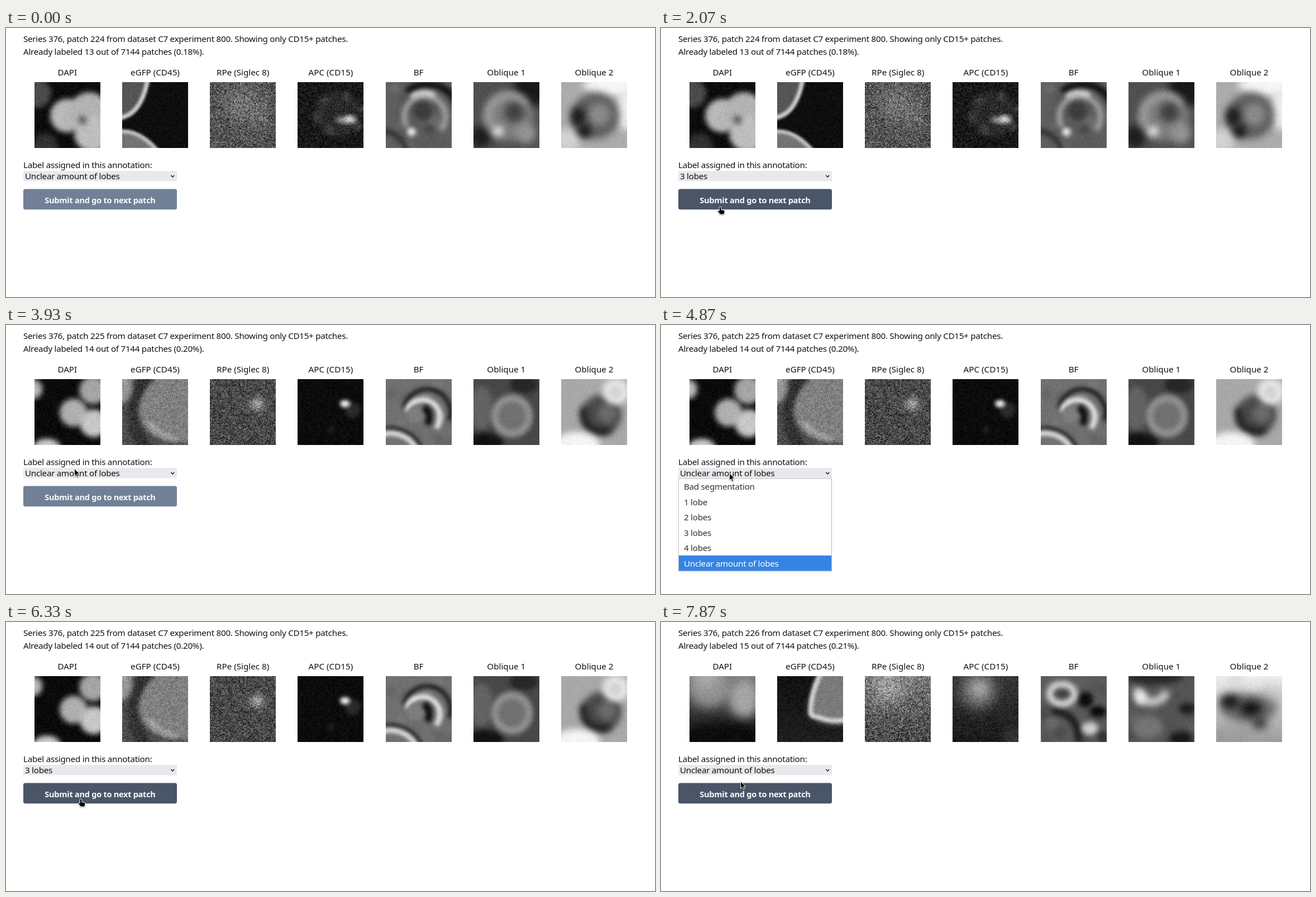
An HTML page with a canvas that plays this animation: 1162x482 px, repeating every 8000 ms.

```html
<!DOCTYPE html>
<html lang="en">
<head>
<meta charset="utf-8">
<title>Patch labeling</title>
<style>
html, body { margin: 0; width: 100%; height: 100%; overflow: hidden; background: #fff; }
svg, canvas { position: absolute; left: 0; top: 0; }
text { font: 15.2px "Noto Sans", "Open Sans", sans-serif; letter-spacing: -.27px; fill: #111; }
.head { letter-spacing: 0; text-anchor: middle; }
.go { font-size: 14.6px; font-weight: 600; letter-spacing: -.3px; text-anchor: middle; fill: #f7fafc; }
#menu text { fill: #2e3436; }
#menu .on { fill: #fff; }
#cursor path { fill: #000; stroke: #fff; stroke-linejoin: round; }
#cursor { filter: drop-shadow(.5px 1px 1px rgba(0, 0, 0, .35)); }
</style>
</head>
<body>
<svg id="ui" width="1162" height="482" viewBox="0 0 1162 482">
  <text id="line1" x="31" y="25"></text>
  <text id="line2" x="31" y="48"></text>
  <g id="heads"></g>
  <text x="31" y="250.5">Label assigned in this annotation:</text>
  <rect x="31" y="256" width="275" height="18.5" fill="#e9e9ed"/>
  <text id="label" x="34" y="271"></text>
  <path d="M295.3 264l3 3 3-3" fill="none" stroke="#111" stroke-width="1.4"/>
  <rect id="button" x="31" y="288.4" width="275" height="36.8" rx="3.5"/>
  <text class="go" x="168.5" y="313.5">Submit and go to next patch</text>
  <g id="menu">
    <rect x="31.5" y="275" width="274" height="166" fill="#fff" stroke="#bbb"/>
    <rect id="bar" x="32" width="273" height="27.5" fill="#3584e4"/>
  </g>
  <g id="cursor">
    <path id="arrow" d="M.5.5V13.5L3.5 10.7L5.6 15.4L7.8 14.4L5.8 9.9H9.8Z"/>
    <path id="hand" d="M-2.8 1Q-1-1 .8 1V5.5L5 6.3Q7.5 6.8 7 9L6.3 12V14H-2.2V12.3L-5.4 9Q-6 7-5 7Q-4 6.3-2.8 8Z"/>
  </g>
</svg>
<script>
const $ = id => document.getElementById(id);
const SIZE = 118, LOOP = 8000, FRAME = 200 / 3, LAG = 100;
const ROW_TOP = 275.5, ROW = 27.5;
const heads = ["DAPI", "eGFP (CD45)", "RPe (Siglec 8)", "APC (CD15)", "BF", "Oblique 1", "Oblique 2"];
const options = ["Bad segmentation", "1 lobe", "2 lobes", "3 lobes", "4 lobes", "Unclear amount of lobes"];
const PICK = 3, UNCLEAR = 5;
const patchX = i => 50.8 + 157.2 * i;

function addText(parent, str, x, y, cls) {
  const el = document.createElementNS("http://www.w3.org/2000/svg", "text");
  el.textContent = str;
  el.setAttribute("x", x);
  el.setAttribute("y", y);
  if (cls) el.setAttribute("class", cls);
  return parent.appendChild(el);
}
heads.forEach((h, i) => addText($("heads"), h, patchX(i) + 59, 85.3, "head"));
const rows = options.map((o, i) => addText($("menu"), o, 41, 295 + ROW * i));

// Soft microscope patches, drawn with blurred shapes in grey tones
let ctx, seed = 7;
const rnd = () => (seed = seed * 16807 % 2147483647) / 2147483647;
const grey = g => `rgb(${g},${g},${g})`;

function base(soft, top, bottom = top) {
  const grad = ctx.createLinearGradient(0, 0, 0, SIZE);
  grad.addColorStop(0, grey(top));
  grad.addColorStop(1, grey(bottom));
  ctx.fillStyle = grad;
  ctx.fillRect(0, 0, SIZE, SIZE);
  ctx.filter = `blur(${soft}px)`;
}
function blob(x, y, r, g, flat = 1) {
  ctx.fillStyle = grey(g);
  ctx.beginPath();
  ctx.ellipse(x, y, r, r * flat, 0, 0, 7);
  ctx.fill();
}
function arc(x, y, r, from, to, g, w) {
  ctx.strokeStyle = grey(g);
  ctx.lineWidth = w;
  ctx.beginPath();
  ctx.arc(x, y, r, from * Math.PI / 180, to * Math.PI / 180);
  ctx.stroke();
}
function cell(d, inside, edge, w) {
  const p = new Path2D(d);
  ctx.fillStyle = grey(inside);
  ctx.fill(p);
  ctx.strokeStyle = grey(edge);
  ctx.lineWidth = w;
  ctx.stroke(p);
}
function mottle(low, high) {
  ctx.globalAlpha = .3;
  for (let i = 0; i < 30; i++) blob(rnd() * SIZE, rnd() * SIZE, 5 + 8 * rnd(), low + (high - low) * rnd());
  ctx.globalAlpha = 1;
}
function grain(amount) {
  const n = 64, cells = Array.from({ length: n * n }, () => (rnd() + rnd() + rnd() - 1.5) * amount);
  const img = ctx.getImageData(0, 0, SIZE, SIZE), d = img.data;
  for (let k = 0; k < d.length; k++) {
    if (k % 4 === 3) continue;
    const x = (k >> 2) % SIZE, y = (k >> 2) / SIZE | 0;
    d[k] += cells[(y * n / SIZE | 0) * n + (x * n / SIZE | 0)];
  }
  ctx.putImageData(img, 0, 0);
}

const first = [
  () => {
    base(5, 12);
    blob(4, 20, 26, 75); blob(18, 116, 24, 50);
    blob(58, 60, 30, 185); blob(98, 54, 36, 178); blob(104, 92, 33, 190); blob(86, 68, 8, 95);
    grain(10);
  },
  () => {
    base(2, 14);
    cell("M46-6Q34 60-6 64H-14V-9Z", 85, 205, 8);
    cell("M-14 90Q28 80 64 124H-14Z", 115, 200, 7);
    grain(8);
  },
  () => {
    base(12, 84);
    blob(60, 38, 34, 112); blob(88, 66, 14, 150, .6);
    grain(50);
  },
  () => {
    base(4, 24);
    blob(72, 56, 42, 42);
    for (let a = 0; a < 6; a++) blob(76 + 42 * Math.cos(a + 2), 58 + 32 * Math.sin(a + 2), 6, 85);
    blob(88, 68, 20, 175, .25); blob(93, 66, 8, 250, .6);
    grain(24);
  },
  () => {
    base(4, 95);
    mottle(50, 150);
    arc(75, 62, 58, 230, 350, 20, 14);
    arc(70, 62, 37, 150, 400, 160, 10); arc(68, 58, 39, 235, 300, 230, 8);
    blob(66, 52, 17, 60); blob(78, 84, 9, 70); blob(46, 89, 8, 245);
    arc(-5, 130, 42, 260, 360, 45, 9);
    grain(6);
  },
  () => {
    base(7, 80);
    blob(104, 12, 32, 25); blob(12, 98, 20, 30);
    blob(64, 62, 44, 125); arc(62, 60, 36, 150, 330, 165, 12);
    blob(73, 54, 18, 65); blob(94, 92, 18, 148); blob(44, 88, 9, 255);
    grain(6);
  },
  () => {
    base(7, 172);
    blob(90, 6, 50, 245, .4); blob(116, 50, 18, 238, 2); blob(12, 104, 22, 210);
    blob(62, 60, 42, 95); blob(68, 58, 20, 138);
    blob(30, 62, 13, 28, 1.4); blob(42, 88, 12, 18);
    grain(6);
  }
];
const second = [
  () => {
    base(5, 10);
    blob(-4, 18, 18, 185); blob(105, 20, 25, 165); blob(22, 124, 25, 205, .7);
    blob(70, 60, 25, 175); blob(106, 79, 25, 200);
    grain(10);
  },
  () => {
    base(4, 78);
    arc(130, 62, 108, 130, 230, 48, 24); blob(0, 12, 18, 150, 1.7);
    cell("M72-9Q2 60 58 96Q80 112 130 108V-9Z", 128, 150, 5);
    arc(98, 48, 58, 90, 150, 185, 6);
    grain(24);
  },
  () => {
    base(6, 72);
    blob(85, 46, 17, 100); blob(85, 44, 8, 235, .7);
    grain(44);
  },
  () => {
    base(3.5, 11);
    blob(99, 56, 14, 42); blob(60, 91, 6, 34); blob(85, 44, 9, 255, .7);
    grain(9);
  },
  () => {
    base(3.5, 112);
    mottle(70, 150);
    arc(74, 60, 42, 190, 380, 30, 8); arc(66, 68, 31, 200, 400, 235, 9);
    blob(54, 64, 16, 125); arc(58, 68, 20, 300, 400, 14, 12);
    arc(8, 150, 62, 240, 340, 25, 6); arc(8, 150, 53, 240, 340, 235, 8);
    grain(6);
  },
  () => {
    base(5, 72);
    blob(14, 52, 22, 98, 1.8); blob(90, 10, 26, 38, .6); blob(18, 114, 36, 18, .5);
    blob(69, 66, 36, 112, 1.1); arc(69, 66, 31, 0, 360, 155, 9);
    grain(6);
  },
  () => {
    base(6, 168);
    blob(72, 64, 36, 75); arc(72, 62, 32, 60, 200, 28, 12); blob(82, 62, 16, 108);
    blob(28, 120, 42, 245, .6); blob(98, 22, 24, 232); blob(97, 24, 11, 205);
    grain(6);
  }
];
const third = [
  () => {
    base(9, 120, 2);
    blob(36, 18, 38, 145); blob(30, 2, 20, 170); blob(98, 40, 28, 165, 1.25); blob(59, 120, 70, 12, .5);
    grain(9);
  },
  () => {
    base(5, 17, 30);
    cell("M80-9Q62 30 60 68Q92 88 130 80V-9Z", 70, 110, 10);
    ctx.filter = "blur(2.5px)";
    cell("M80-9Q60 30 60 64Q60 72 72 73Q98 84 130 77V-9Z", 122, 215, 8);
    grain(12);
  },
  () => {
    base(14, 118, 72);
    blob(42, 18, 28, 165);
    grain(54);
  },
  () => {
    base(10, 54, 24);
    blob(46, 26, 34, 105); blob(48, 22, 14, 190); blob(112, 112, 22, 55);
    grain(18);
  },
  () => {
    base(5, 92);
    mottle(30, 150);
    blob(80, 42, 14, 12); blob(102, 63, 15, 6, .6); arc(20, 110, 48, 270, 370, 28, 14);
    blob(38, 32, 28, 215, .85); blob(38, 32, 16, 65, .7);
    blob(88, 94, 15, 205, .8); blob(112, 110, 12, 50);
    grain(6);
  },
  () => {
    base(6, 86);
    mottle(40, 130);
    blob(46, 2, 52, 38, .25); arc(42, 18, 28, 20, 170, 205, 15); blob(22, 38, 10, 235, 1.3);
    blob(105, 58, 16, 22, .6); blob(94, 112, 22, 22, .6); blob(34, 92, 28, 116, .7);
    grain(6);
  },
  () => {
    base(8, 238, 155);
    mottle(130, 190);
    blob(58, 58, 50, 105, .5); blob(24, 45, 18, 18, .7); blob(62, 58, 20, 18, .7); blob(78, 84, 12, 50);
    grain(6);
  }
];
const sets = [first, second, third].map(set => {
  const box = document.body.insertBefore(document.createElement("div"), $("ui"));
  set.forEach((draw, i) => {
    const cv = box.appendChild(document.createElement("canvas"));
    cv.width = cv.height = SIZE;
    cv.style.left = Math.round(patchX(i)) + "px";
    cv.style.top = "97px";
    ctx = cv.getContext("2d");
    draw();
  });
  return box;
});

// Each round: open the menu, pick a label, send it
const rounds = [{ open: 600, pick: 1330, send: 2530 }, { open: 4870, pick: 5670, send: 7070 }];
const enter = { from: 0, to: 70, x: 23, y: 268 };
const trips = [
  enter,
  { from: 200, to: 530, x: 50, y: 264 },
  { from: 600, to: 1000, x: 76, y: 370 },
  { from: 1270, to: 1730, x: 107, y: 320 },
  { from: 3600, to: 3930, x: 122, y: 257 },
  { from: 4330, to: 4470, x: 122, y: 261 },
  { from: 4800, to: 5400, x: 113, y: 367 },
  { from: 5930, to: 6330, x: 135, y: 317 },
  { from: 7530, to: 7730, x: 141, y: 333 },
  { from: 7730, to: 7870, x: 142, y: 285 }
];
const ease = p => p * p * (3 - 2 * p);
const show = (el, on) => { el.style.visibility = on ? "visible" : "hidden"; };

function pointer(t) {
  let { x, y } = enter;
  for (const trip of trips) {
    if (t < trip.from) break;
    const p = ease(Math.min(1, (t - trip.from) / (trip.to - trip.from)));
    x += (trip.x - x) * p;
    y += (trip.y - y) * p;
  }
  return { x, y };
}
const onButton = p => p.y > 288 && p.y < 325;

function render(time) {
  const t = Math.floor((time + 5) / FRAME) * FRAME + 4;
  const page = rounds.filter(r => t >= r.send).length;
  const open = rounds.some(r => t >= r.open && t < r.pick);
  const picked = rounds.some(r => t >= r.pick && t < r.send);
  const loading = rounds.some(r => t >= r.send && t < r.send + LAG);
  const now = pointer(t), seen = pointer(t - LAG);
  const hover = onButton(seen) && !open && !loading;
  const hand = onButton(now) && !open && t > rounds[0].pick;
  const row = seen.y < ROW_TOP ? UNCLEAR : Math.floor((seen.y - ROW_TOP) / ROW);

  sets.forEach((box, i) => show(box, i === page));
  const done = 13 + page, total = 7144;
  $("line1").textContent = `Series 376, patch ${224 + page} from dataset C7 experiment 800. Showing only CD15+ patches.`;
  $("line2").textContent = `Already labeled ${done} out of ${total} patches (${(100 * done / total).toFixed(2)}%).`;
  $("label").textContent = options[picked ? PICK : UNCLEAR];
  $("button").setAttribute("fill", hover ? "#4a5568" : "#718096");
  show($("menu"), open);
  $("bar").setAttribute("y", ROW_TOP + ROW * row);
  rows.forEach((el, i) => el.setAttribute("class", i === row ? "on" : ""));
  $("cursor").setAttribute("transform", `translate(${Math.round(now.x)} ${Math.round(now.y)})`);
  show($("arrow"), !hand && t >= enter.to);
  show($("hand"), hand);
}

const start = performance.now();
function tick() {
  render((performance.now() - start) % LOOP);
  requestAnimationFrame(tick);
}
tick();
</script>
</body>
</html>
```
